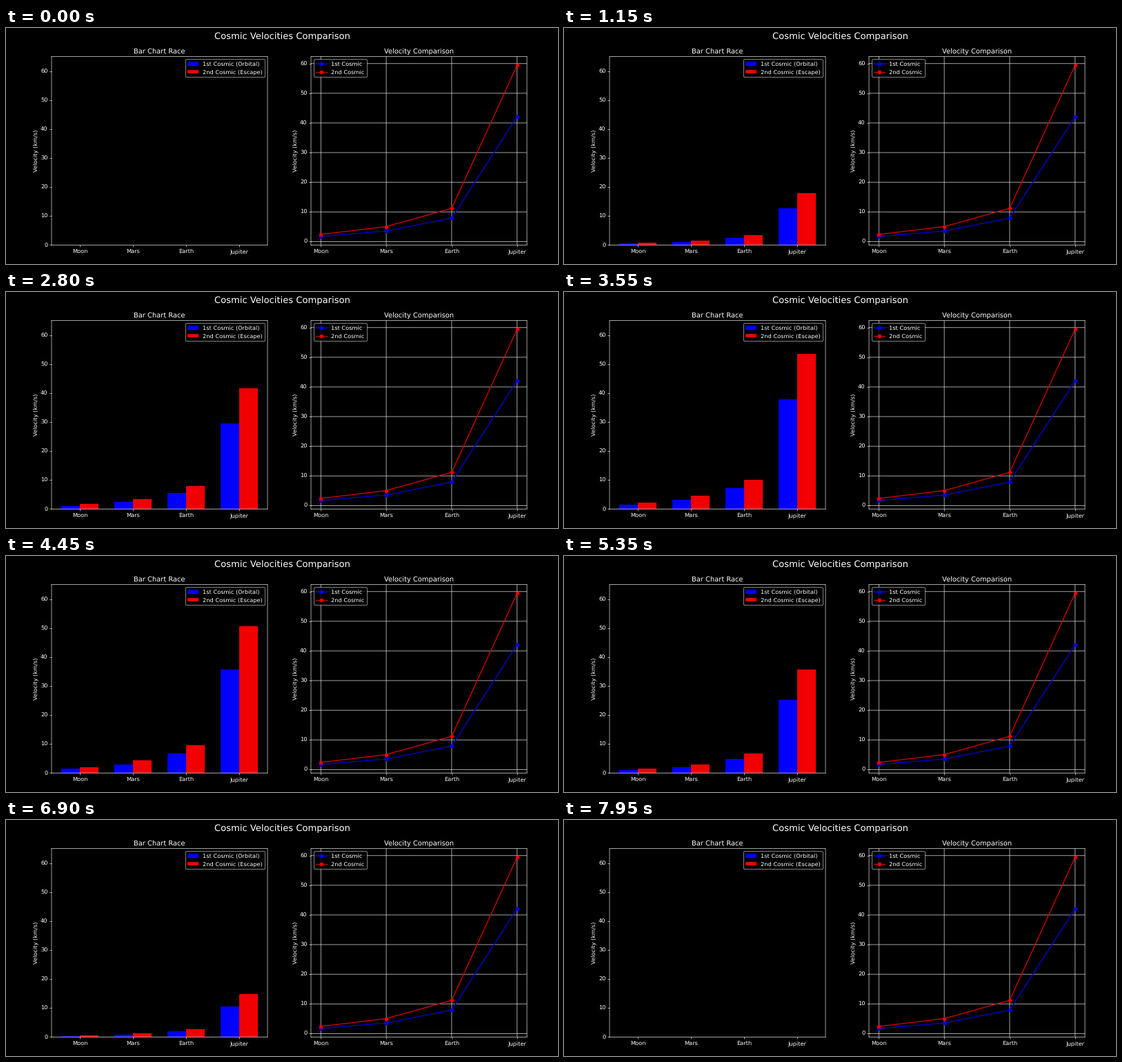
Recreate the animation shown at these times as a matplotlib script. Size 800x343 px, loop 8 s.

```python
import numpy as np
import matplotlib.pyplot as plt
from matplotlib.animation import FuncAnimation

WIDTH, HEIGHT, DPI = 800, 343, 400 / 7
INTERVAL, FRAMES = 50, 160
TICKS_PER_STEP, STEPS = 4, 20

BODIES = ["Moon", "Mars", "Earth", "Jupiter"]
ORBITAL = np.array([1.68, 3.55, 7.91, 42.1])
ESCAPE = np.array([2.38, 5.03, 11.19, 59.5])
BLUE, RED = "#0000ff", "#f00000"
LINE_BLUE, LINE_RED = "#0000d2", "#d20000"
BAR_WIDTH = 0.35
TEXT_SIZE, TITLE_SIZE, HEADING_SIZE = 10.4, 12.4, 16.5

plt.style.use("dark_background")
plt.rcParams.update({
    "font.family": "DejaVu Sans",
    "text.hinting": "none",
    "axes.titlesize": TITLE_SIZE,
    "axes.labelsize": TEXT_SIZE,
    "xtick.labelsize": TEXT_SIZE,
    "ytick.labelsize": TEXT_SIZE,
})

# The tiny margin keeps the pixel size from rounding down.
fig = plt.figure(figsize=((WIDTH + 1e-6) / DPI, (HEIGHT + 1e-6) / DPI), dpi=DPI)
fig.suptitle("Cosmic Velocities Comparison", fontsize=HEADING_SIZE)


def add_panel(left, title):
    """Add an axes whose left edge is given in pixels."""
    ax = fig.add_axes([left / WIDTH, 27.5 / HEIGHT, 313 / WIDTH, 274 / HEIGHT])
    ax.set_title(title)
    ax.set_ylabel("Velocity (km/s)")
    plt.setp(ax.spines.values(), snap=False)
    return ax


def add_legend(ax, loc):
    """Add a legend whose text is a little larger than its layout unit."""
    legend = ax.legend(loc=loc, fontsize=10)
    plt.setp(legend.get_texts(), fontsize=TEXT_SIZE)


def add_line(ax, speeds, line_color, marker_color, label):
    ax.plot(BODIES, speeds, "o-", color=line_color, linewidth=1.7,
            markerfacecolor=marker_color, markeredgecolor=marker_color,
            label=label)


x = np.arange(len(BODIES))

bar_ax = add_panel(66, "Bar Chart Race")
orbital_bars = bar_ax.bar(x - BAR_WIDTH / 2, ORBITAL, BAR_WIDTH,
                          color=BLUE, label="1st Cosmic (Orbital)")
escape_bars = bar_ax.bar(x + BAR_WIDTH / 2, ESCAPE, BAR_WIDTH,
                         color=RED, label="2nd Cosmic (Escape)")
bar_ax.set_xticks(x, BODIES)
bar_ax.set_ylim(0, 65)
add_legend(bar_ax, "upper right")

line_ax = add_panel(442, "Velocity Comparison")
add_line(line_ax, ORBITAL, LINE_BLUE, BLUE, "1st Cosmic")
add_line(line_ax, ESCAPE, LINE_RED, RED, "2nd Cosmic")
line_ax.grid(True)
plt.setp(line_ax.get_xgridlines() + line_ax.get_ygridlines(), snap=False)
add_legend(line_ax, "upper left")


def update(frame):
    step = (frame + 1) // TICKS_PER_STEP % (2 * STEPS)
    # Rise through all steps, then play them back in reverse.
    progress = min(step, 2 * STEPS - 1 - step) / STEPS
    for bars, speeds in ((orbital_bars, ORBITAL), (escape_bars, ESCAPE)):
        for bar, speed in zip(bars, speeds):
            bar.set_height(speed * progress)
    return [*orbital_bars, *escape_bars]


animation = FuncAnimation(fig, update, frames=FRAMES, interval=INTERVAL,
                          repeat=True, repeat_delay=0)
plt.show()
```
